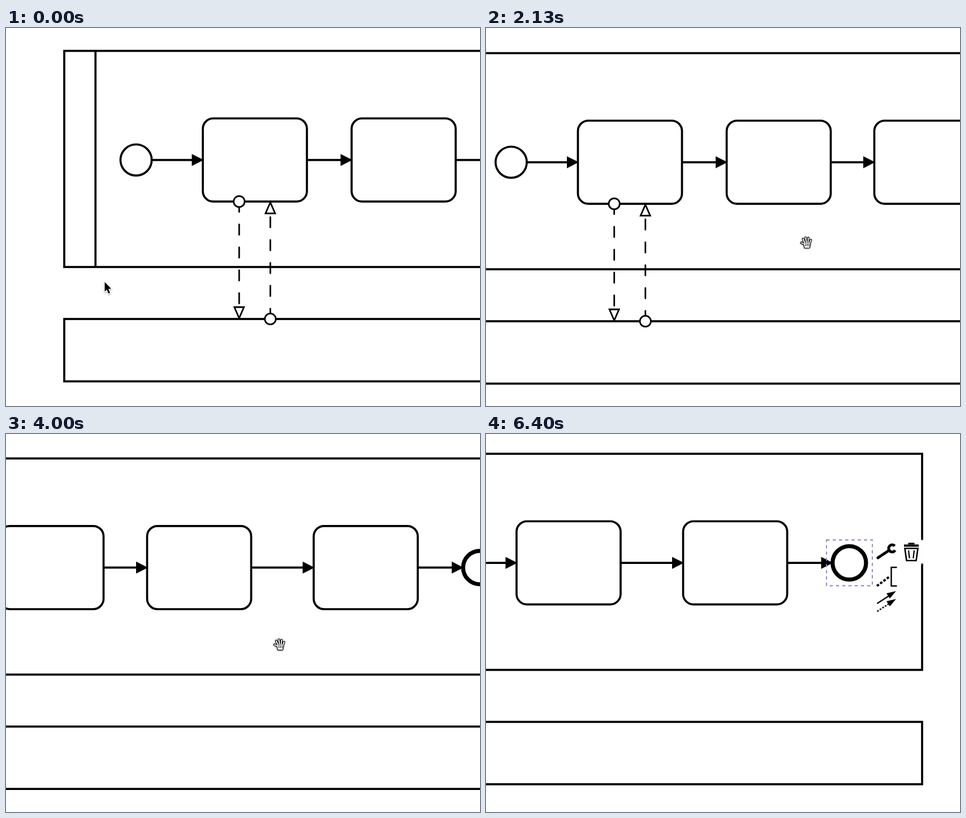
Recreate the animation shown at these times as an HTML page with a canvas. Size 838 px wide and 669 px high, loop 7.14 s.

```html
<!DOCTYPE html>
<html lang="en">
<head>
<meta charset="utf-8">
<title>Panning a process diagram</title>
<style>
  html, body { margin: 0; width: 100%; height: 100%; overflow: hidden; background: #fff; }
  canvas { display: block; }
</style>
</head>
<body>
<canvas id="stage" width="838" height="669"></canvas>
<script>
const ctx = document.getElementById('stage').getContext('2d');
const LOOP = 7140, TICK = 200 / 3, ZOOM = 1.84;
const HOVER = '#ff8888', SELECTED = '#8080e4';
const MID = 233.6, TASK_TOP = 160, TASK_W = 100 * ZOOM, TASK_H = 80 * ZOOM;
const POOL = [103, 40.5, 1486, 382.5];

// Each move takes the pointer to (x, y) between two ticks; a drag pans the diagram with it.
const START = { x: 174, y: 449 };
const moves = [
  { from: 0, to: 7, x: 272, y: 368 },
  { from: 9, to: 19, x: 86.5, y: 372, bend: -1.7, drag: true, brake: -0.35 },
  { from: 20, to: 31, x: 566.5, y: 379.5, bend: 47 },
  { from: 32, to: 44, x: 350, y: 374.5, bend: 1, drag: true, brake: 0.45 },
  { from: 45, to: 53, x: 704.3, y: 368.5, bend: 20 },
  { from: 53, to: 75, x: 288.3, y: 364, bend: 6.2, drag: true, brake: 1.17 },
  { from: 77, to: 84, x: 640, y: 240 },
  { from: 92, to: 95, x: 782, y: 300 }
];

function progress({ from, to, drag, brake }, tick) {
  const u = Math.min((tick - from) / (to - from), 1);
  return drag ? 1 - (1 - u) * Math.exp(-brake * u) : u * u * (3 - 2 * u);
}

function pose(tick) {
  const tip = { ...START }, pan = { x: 0, y: 0 };
  for (const move of moves.filter(m => m.from <= tick)) {
    const p = progress(move, tick);
    const dx = (move.x - tip.x) * p;
    const dy = (move.y - tip.y) * p + (move.bend ?? 0) * Math.sin(Math.PI * p);
    tip.x += dx;
    tip.y += dy;
    if (move.drag) {
      pan.x += dx;
      pan.y += dy;
    }
  }
  return { tip, pan, gripping: moves.find(m => tick < m.to)?.drag };
}

function style(width, fill = '#fff', stroke = '#000') {
  ctx.lineWidth = width;
  ctx.fillStyle = fill;
  ctx.strokeStyle = stroke;
}

function poly(points, closed = false) {
  ctx.beginPath();
  points.forEach(([x, y]) => ctx.lineTo(x, y));
  if (closed) ctx.closePath();
}

function line(width, ...points) {
  ctx.lineWidth = width;
  poly(points);
  ctx.stroke();
}

function solid(...points) {
  ctx.fillStyle = '#000';
  poly(points, true);
  ctx.fill();
}

function dashed(dash, draw) {
  ctx.setLineDash(dash);
  draw();
  ctx.setLineDash([]);
}

function circle(x, y, r, width) {
  style(width);
  ctx.beginPath();
  ctx.arc(x, y, r, 0, 2 * Math.PI);
  ctx.fill();
  ctx.stroke();
}

function outline([x, y, w, h], color) {
  style(ZOOM, '#fff', color);
  dashed([3 * ZOOM, 3 * ZOOM], () => ctx.strokeRect(x - 12, y - 12, w + 24, h + 24));
}

function task(x) {
  style(3.7);
  ctx.beginPath();
  ctx.roundRect(x, TASK_TOP, TASK_W, TASK_H, 10 * ZOOM);
  ctx.fill();
  ctx.stroke();
}

function sequenceFlow(from, to) {
  style(3.7);
  line(3.7, [from, MID], [to - 10, MID]);
  solid([to - 19.5, MID - 10.7], [to + 1.5, MID], [to - 19.5, MID + 10.7]);
}

function messageFlow(x, from, to) {
  const dir = Math.sign(to - from);
  style(2.8);
  ctx.lineCap = 'round';
  dashed([10 * ZOOM, 12 * ZOOM], () => line(2.8, [x, from], [x, to - 20 * dir]));
  ctx.lineCap = 'butt';
  circle(x, from, 9.7, 2.8);
  poly([[x - 8.5, to - 21 * dir], [x + 8.5, to - 21 * dir], [x, to - 1.5 * dir]], true);
  ctx.fill();
  ctx.stroke();
}

function diagram() {
  const [left, top, width, height] = POOL;
  const tasks = [348, 611, 872, 1166.5], taskBottom = TASK_TOP + TASK_H;
  style(3.7);
  ctx.strokeRect(left, top, width, height);
  line(3.7, [left + 30 * ZOOM, top], [left + 30 * ZOOM, top + height]);
  ctx.strokeRect(left, 515, width, 60 * ZOOM);

  circle(230, MID, 15 * ZOOM, 3.7);
  tasks.forEach(task);
  [258, ...tasks.map(x => x + TASK_W)].forEach((x, i) => sequenceFlow(x, tasks[i] ?? 1430));
  circle(1460.3, MID, 29.6, 7.2);
  messageFlow(412.2, taskBottom, 515);
  messageFlow(467.3, 515, taskBottom);
}

function connectIcon(y, dash) {
  dashed(dash, () => line(2.4, [691.5, y], [713, y - 14]));
  solid([725, y - 22], [708, y - 18], [714, y - 9]);
}

function contextPad() {
  ctx.save();
  ctx.shadowColor = '#fff';
  ctx.shadowBlur = 4;
  style(1, 'rgba(255,255,255,0.97)');
  ctx.fillRect(688, 188, 85, 41);
  ctx.restore();
  style(2.5);

  // Wrench
  ctx.lineCap = 'round';
  line(5, [693, 219], [711, 207]);
  ctx.lineCap = 'butt';
  ctx.beginPath();
  ctx.arc(718, 202.5, 6.2, 0.55, 2 * Math.PI - 0.75);
  ctx.stroke();

  // Bin
  line(4, [739, 197.5], [765, 197.5]);
  line(3, [746.5, 194], [757.5, 194]);
  ctx.lineWidth = 2.6;
  poly([[740.5, 202.5], [763.5, 202.5], [760.5, 224], [743.5, 224]], true);
  ctx.stroke();
  for (const side of [-1, 1]) line(2.2, [752 + 5 * side, 206], [752 + 3.3 * side, 220]);

  // Annotation
  line(2.4, [726.5, 236], [716.5, 236], [716.5, 269], [726.5, 269]);
  dashed([4.5, 2.8], () => line(4, [691, 269], [714, 252]));

  connectIcon(300, []);
  connectIcon(314, [3.2, 2.2]);
}

function arrow() {
  style(2.6, '#000', '#fff');
  poly([[0.5, 0.5], [0.5, 17.5], [4.2, 14], [7.2, 21], [10, 19.8], [7, 12.8], [12, 12.5]], true);
  ctx.stroke();
  ctx.shadowColor = 'transparent';
  ctx.fill();
}

function hand() {
  const fingertips = [[-9, 0.5], [-6, -6], [-1.4, -8.5], [3.3, -7.8], [7.8, -4.2]];
  ctx.lineCap = 'round';
  // A wide black pass under a narrow white one leaves the contour
  for (const [color, width] of [['#000', 4.2], ['#fff', 1.9]]) {
    style(width, color, color);
    for (const [x, y] of fingertips) line(width, [x, y], [1 + x / 2, 3]);
    poly([[-3, 3], [5.5, 2], [4.5, 8.5], [-2.5, 8.5]], true);
    ctx.fill();
    ctx.stroke();
    ctx.shadowColor = 'transparent';
  }
  ctx.strokeStyle = '#000';
  for (let x = -1.2; x < 5; x += 2.8) line(1, [x, 2], [x, 6.5]);
}

function pointer(tip, draw) {
  ctx.save();
  ctx.translate(tip.x, tip.y);
  ctx.lineJoin = 'round';
  ctx.shadowColor = 'rgba(0,0,0,0.3)';
  ctx.shadowBlur = 3;
  ctx.shadowOffsetY = 1.5;
  draw();
  ctx.restore();
}

function render(time) {
  // Ticks are shown on times rounded to 10 ms, so allow for an early one
  const tick = Math.floor((time % LOOP + 4) / TICK);
  const { tip, pan, gripping } = pose(tick);
  const entering = tick < 7 && tip.y < 423;
  const returning = tick > 20 && tick < 31 && tip.x > 282;
  const leaving = tick > 93 && tick < 96;
  const selected = tick >= 86;

  style(1);
  ctx.fillRect(0, 0, 838, 669);
  ctx.save();
  ctx.translate(pan.x, pan.y);
  diagram();
  if (entering || returning || leaving) outline(POOL, HOVER);
  if (tick >= 83) outline([1432, 205, 57, 57], selected ? SELECTED : HOVER);
  ctx.restore();

  if (selected) contextPad();
  if (tick < 96) pointer(tip, gripping ? hand : arrow);
}

function loop() {
  render(performance.now());
  requestAnimationFrame(loop);
}
loop();
</script>
</body>
</html>
```
